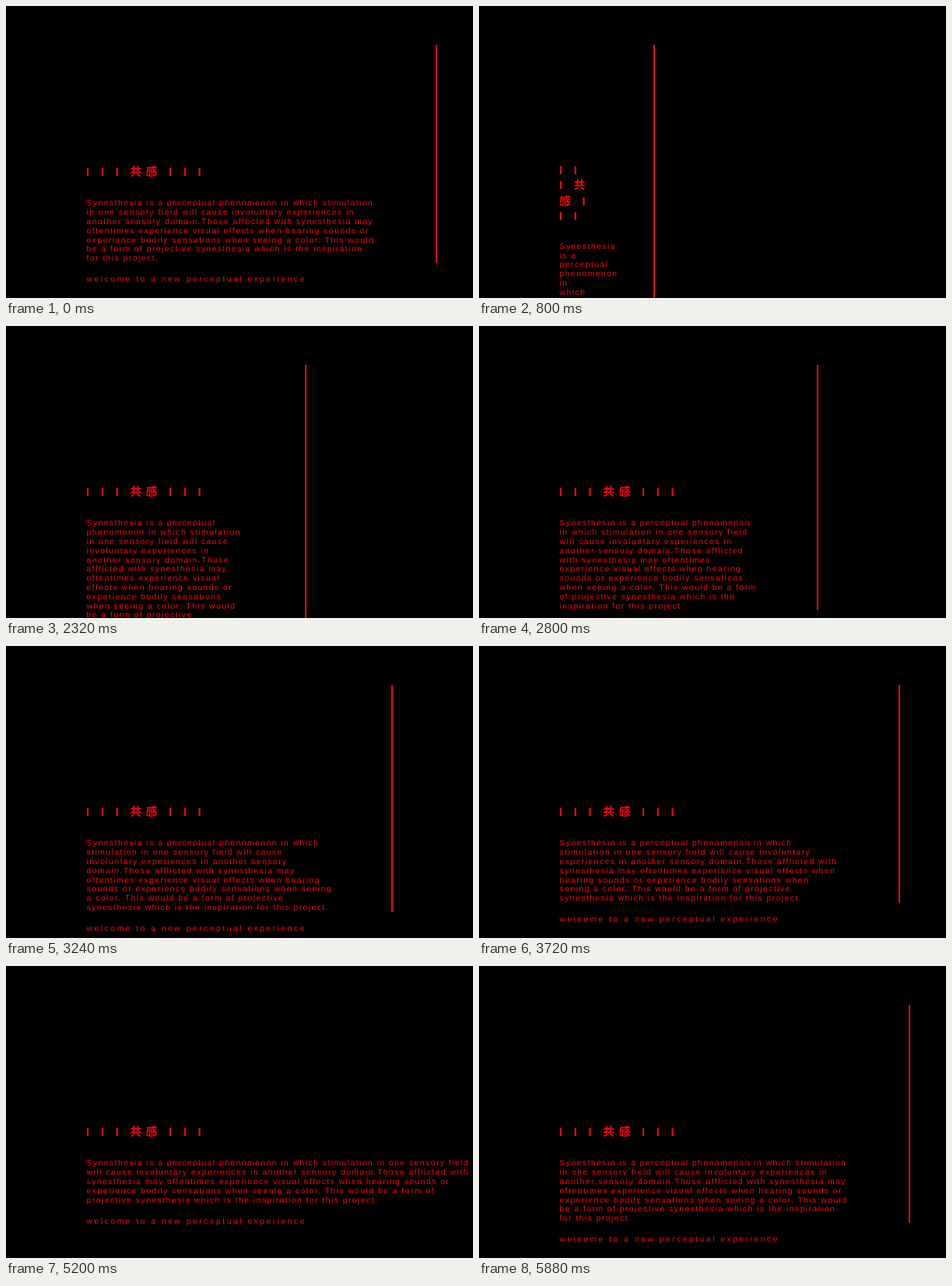
Recreate the animation shown at these times as an HTML page. Size 600 by 375 pixels, loop 6 s.

```html
<!DOCTYPE html>
<html lang="zh">
<head>
<meta charset="utf-8">
<title>共感</title>
<style>
  html, body {
    margin: 0;
    width: 100%;
    height: 100%;
    overflow: hidden;
    background: #000;
  }
  #stage {
    --red: #f80810;
    position: relative;
    box-sizing: border-box;
    height: 100%;
    padding-top: 50px;
    overflow: hidden;
    color: var(--red);
    font: 10.3px/11.83px "Liberation Sans", Arial, "Noto Sans CJK SC", "Noto Sans CJK JP", "Noto Sans CJK", sans-serif;
    text-rendering: geometricPrecision;
  }
  #panel {
    box-sizing: border-box;
    padding: 152px 75px 0 103px;
    border-right: 2px solid var(--red);
    animation: drag 6s steps(6, start) infinite;
  }
  h1, p { position: relative; top: 1px; }
  h1 {
    margin: 0 0 24.2px;
    font-size: 15px;
    line-height: 17.25px;
    letter-spacing: 5.2px;
  }
  h1 span { line-height: 21px; }
  p {
    left: 0.6px;
    margin: 0;
    letter-spacing: 1.486px;
    font-feature-settings: "liga" 1;
  }
  .welcome {
    margin: 15.2px 0 0 103px;
    letter-spacing: 2.52px;
    white-space: nowrap;
  }

  /* The right edge is dragged in jerks with pauses; the text reflows */
  @keyframes drag {
    0%, 6.65% { width: 554px; }
    6.66%, 10.66% { width: 204px; }
    13.33%, 14.66% { width: 226px; }
    18%, 20.66% { width: 257px; }
    25.33%, 28.66% { width: 301px; }
    31.33%, 32.66% { width: 332px; }
    34%, 36.66% { width: 361px; }
    46.66%, 48.66% { width: 436px; }
    58.66%, 61.98% { width: 527px; }
    61.99%, 64% { width: 541px; }
    66%, 68.66% { width: 573px; }
    70.66%, 75.32% { width: 620px; }
    75.33%, 76% { width: 628px; }
    78%, 82% { width: 641px; }
    92%, 94% { width: 705px; }
    98%, 100% { width: 554px; }
  }
</style>
</head>
<body>
<div id="stage">
  <div id="panel">
    <h1>I I I <span>共感</span> I I I</h1>
    <p>Synesthesia is a perceptual phenomenon in which stimulation in one sensory field will cause involuntary experiences in another sensory domain.Those afflicted with synesthesia may oftentimes experience visual effects when hearing sounds or experience bodily sensations when seeing a color. This would be a form of projective synesthesia which is the inspiration for this project.</p>
  </div>
  <p class="welcome">welcome to a new perceptual experience</p>
</div>
</body>
</html>
```
